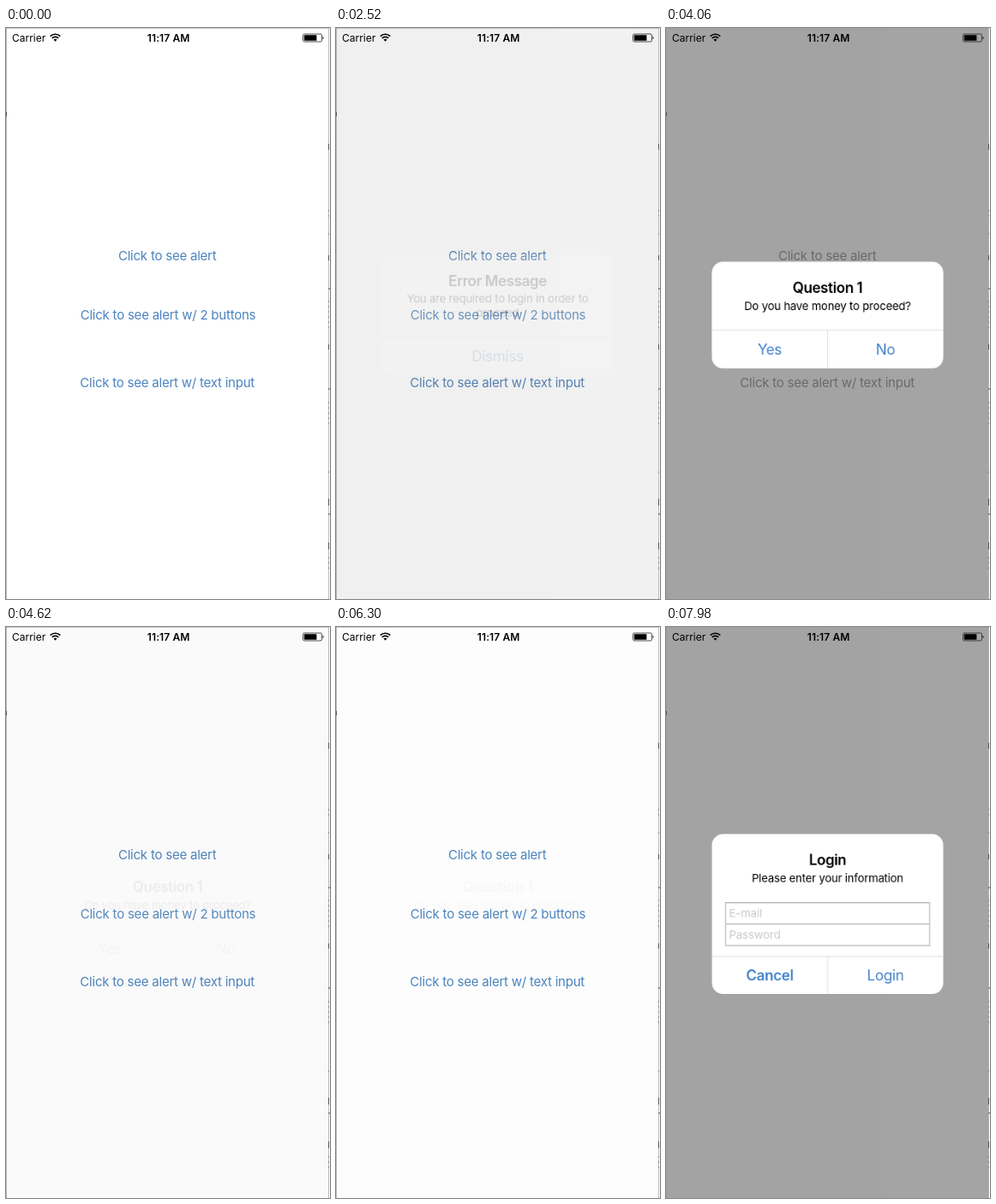
Write an HTML page that moves like this. It is 378 px wide and 666 px high and loops after 8000 ms.

```html
<!DOCTYPE html>
<html lang="en">
<head>
<meta charset="utf-8">
<title>Alert dialogs</title>
<style>
  html, body { margin: 0; width: 100%; height: 100%; overflow: hidden; background: #fff; }
  svg { display: block; width: 378px; height: 666px; }
  text { font-family: Inter, "Open Sans", sans-serif; }

  .mid text, text.mid { text-anchor: middle; }
  .status { font-size: 12px; }
  .clock { font-weight: 600; letter-spacing: .1px; }

  .links text { font-size: 15px; letter-spacing: -.22px; }
  .title { font-size: 17px; font-weight: 600; letter-spacing: -.4px; }
  .msg { font-size: 13px; letter-spacing: -.14px; }
  .action { font-size: 17px; letter-spacing: -.3px; fill: #3f80cd; }
  .bold { font-weight: 600; }
  .hint { font-size: 13px; fill: #c9c9ce; }
  .card { fill: #fff; }
  .rule { fill: none; stroke: #e2e2e4; }
  .field { fill: none; stroke: #b0b0b0; }

  .links, .links text, .dim, .dialog, .caret {
    animation: 8s ease-in-out infinite;
  }
  .links { fill: #4a83c0; animation-name: tint; }
  .dim { opacity: 0; animation-name: dim; }
  .dialog { opacity: 0; transform-origin: 188.5px 334.8px; }
  .caret { fill: #4a83e0; opacity: 0; animation-name: caret; }
  #link1 { animation-name: press1; }
  #link2 { animation-name: press2; }
  #link3 { animation-name: press3; }
  #error { animation-name: error; }
  #question { animation-name: question; }
  #login { animation-name: login; }

  @keyframes dim {
    0% { opacity: 0; }
    12.625%, 40%, 63.4375%, 85.375% { opacity: 0; animation-timing-function: cubic-bezier(.1, .85, .2, 1); }
    18.125%, 25.75%, 45.5%, 51.125%, 68.9375%, 71.6875%, 90.875%, 100% { opacity: .36; }
    33.75%, 59.125%, 79.6875% { opacity: 0; }
  }
  @keyframes tint {
    0%, 33.75%, 59.125%, 79.6875% { fill: #4a83c0; }
    12.625%, 40%, 63.4375%, 85.375% { fill: #4a83c0; animation-timing-function: cubic-bezier(.1, .85, .2, 1); }
    18.125%, 25.75%, 45.5%, 51.125%, 68.9375%, 71.6875%, 90.875%, 100% { fill: #a4a4a4; }
  }

  @keyframes press1 {
    0%, 6.99% { opacity: 1; }
    7%, 12.625% { opacity: .25; }
    18.125%, 100% { opacity: 1; }
  }
  @keyframes press2 {
    0%, 38.49% { opacity: 1; }
    38.5%, 40% { opacity: .25; }
    45.5%, 62.12% { opacity: 1; }
    62.125%, 63.4375% { opacity: .25; }
    68.9375%, 100% { opacity: 1; }
  }
  @keyframes press3 {
    0%, 83.99% { opacity: 1; }
    84%, 85.375% { opacity: .25; }
    90.875%, 100% { opacity: 1; }
  }

  @keyframes error {
    0% { opacity: 0; transform: scale(1.15); }
    12.625% { opacity: 0; transform: scale(1.15); animation-timing-function: cubic-bezier(.1, .85, .2, 1); }
    18.125%, 25.75% { opacity: 1; transform: none; }
    33.75%, 100% { opacity: 0; transform: none; }
  }
  @keyframes question {
    0% { opacity: 0; transform: scale(1.15); }
    40%, 63.4375% { opacity: 0; transform: scale(1.15); animation-timing-function: cubic-bezier(.1, .85, .2, 1); }
    45.5%, 51.125%, 68.9375%, 71.6875% { opacity: 1; transform: none; }
    59.125%, 79.6875%, 100% { opacity: 0; transform: none; }
  }
  @keyframes login {
    0% { opacity: 0; transform: scale(1.15); }
    85.375% { opacity: 0; transform: scale(1.15); animation-timing-function: cubic-bezier(.1, .85, .2, 1); }
    90.875%, 100% { opacity: 1; transform: none; }
  }
  @keyframes caret {
    0%, 90.875% { opacity: 0; }
    91%, 94.4% { opacity: 1; }
    96.2%, 100% { opacity: 0; }
  }
</style>
</head>
<body>
<svg viewBox="0 0 378 666">
  <rect width="378" height="666" fill="#fff"/>

  <g class="links mid">
    <text id="link1" x="188.2" y="270.5">Click to see alert</text>
    <text id="link2" x="189" y="339.7">Click to see alert w/ 2 buttons</text>
    <text id="link3" x="188.2" y="418.6">Click to see alert w/ text input</text>
  </g>

  <rect class="dim" width="376.5" height="666"/>

  <!-- window edges -->
  <path d="M.5 0V666" stroke="#999" stroke-opacity=".7"/>
  <path d="M0 .5H377" stroke="#999" stroke-opacity=".5"/>
  <path d="M376.5 0V666" stroke="#aaa" stroke-opacity=".8"/>
  <path d="M.5 98v5M376.5 135v7M376.5 265v6M376.5 369v6M376.5 549v8M376.5 600v8" stroke="#555"/>
  <path d="M376 304h2M376 421h2M376 567h2" stroke="#444"/>
  <path d="M376.5 212v8M376.5 239v6M376.5 318v32M376.5 436v30M376.5 517v2M376.5 617v15" stroke="#888" stroke-dasharray="2 4"/>

  <!-- status bar -->
  <text class="status" x="7" y="15.6">Carrier</text>
  <g fill="none" stroke="#000" stroke-width="1.6">
    <path d="M51.7 9.6a8.2 8.2 0 0 1 11.6 0M53.8 11.9a5.2 5.2 0 0 1 7.4 0"/>
  </g>
  <path d="M57.5 15.8l-2-2.2a2.9 2.9 0 0 1 4 0z"/>
  <text class="status clock mid" x="189.6" y="15.8">11:17 AM</text>
  <rect x="346.5" y="7" width="22" height="9" rx="1.6" fill="none" stroke="#222" stroke-width=".8"/>
  <rect x="347.8" y="8.2" width="14.6" height="6.6" rx=".6"/>
  <path d="M369.6 10v3a1.6 1.6 0 0 0 0-3z"/>

  <g id="error" class="dialog mid">
    <rect class="card" x="53.5" y="264.5" width="270" height="140.5" rx="13"/>
    <path class="rule" d="M53.5 360.5h270"/>
    <text class="title" x="188.5" y="300.7">Error Message</text>
    <text class="msg" x="188.5" y="320.5">You are required to login in order to</text>
    <text class="msg" x="188.5" y="336.3">proceed</text>
    <text class="action" x="188.5" y="389.2">Dismiss</text>
  </g>

  <g id="question" class="dialog mid">
    <rect class="card" x="53.5" y="272.5" width="270" height="124.5" rx="13"/>
    <path class="rule" d="M53.5 352.5h270M188.5 352.5V397"/>
    <text class="title" x="188.5" y="308.6">Question 1</text>
    <text class="msg" x="188.5" y="328.6">Do you have money to proceed?</text>
    <text class="action" x="121" y="381.4">Yes</text>
    <text class="action" x="256" y="381.4">No</text>
  </g>

  <g id="login" class="dialog">
    <rect class="card" x="53.5" y="241.5" width="270" height="186.5" rx="13"/>
    <path class="rule" d="M53.5 384.2h270M188.5 384.2V428"/>
    <g class="mid">
      <text class="title" x="188.5" y="277.6">Login</text>
      <text class="msg" x="188.5" y="297.6">Please enter your information</text>
      <text class="action bold" x="121" y="412.4">Cancel</text>
      <text class="action" x="256" y="412.4">Login</text>
    </g>
    <path class="field" d="M69.5 321.5h238v50h-238zM69.5 346.5h238"/>
    <text class="hint" x="73.5" y="338.8">E-mail</text>
    <text class="hint" x="73.5" y="363.8">Password</text>
    <rect class="caret" x="74" y="327" width="2" height="15"/>
  </g>
</svg>
</body>
</html>
```
